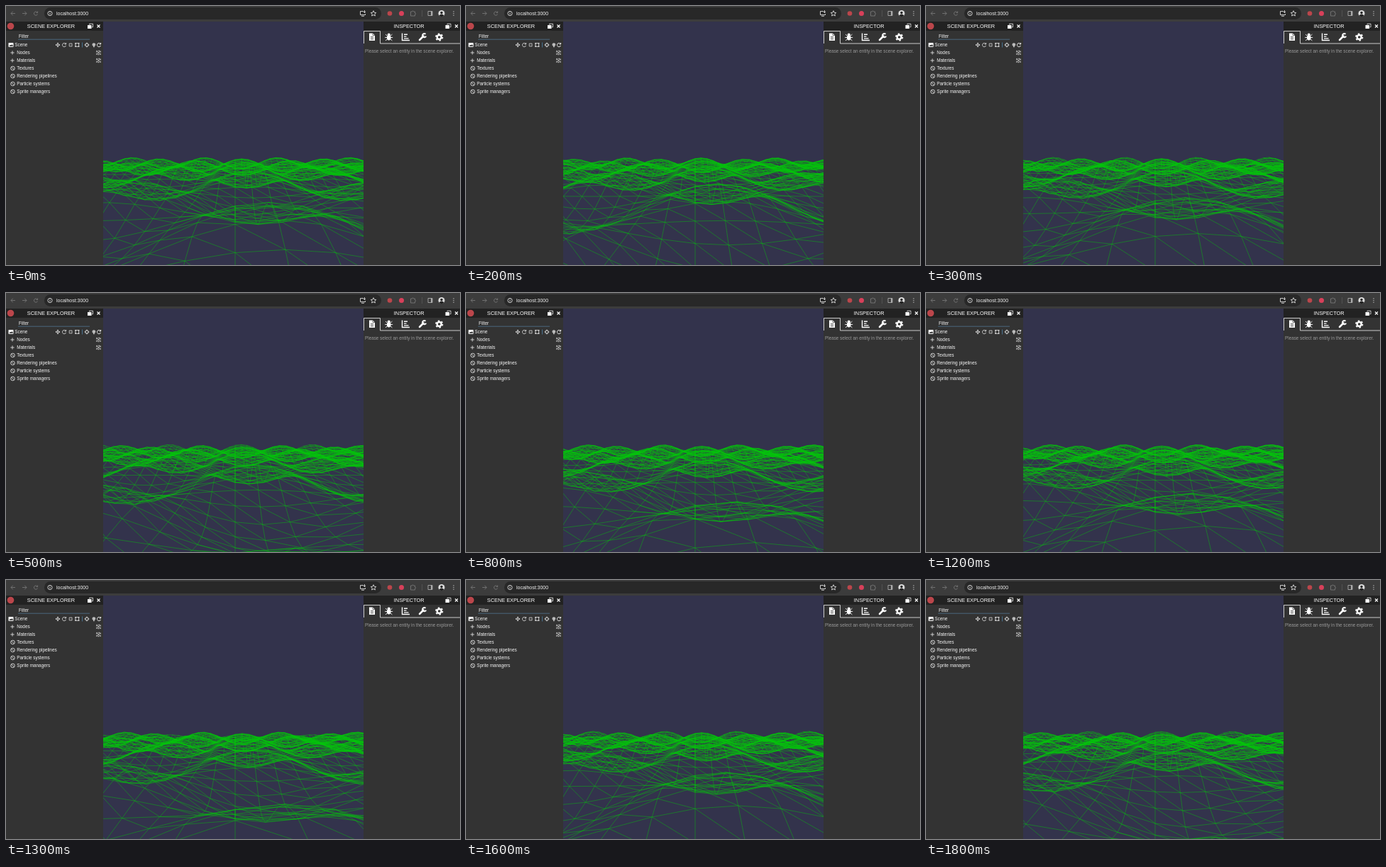
These frames come from a looping animation (640x366 px, 1900 ms). An HTML page with a canvas:

```html
<!DOCTYPE html>
<html lang="en">
<head>
<meta charset="utf-8">
<title>Wireframe waves</title>
<style>
  html, body { margin: 0; width: 100%; height: 100%; overflow: hidden; background: #333; }
  svg, canvas { position: absolute; left: 0; top: 0; }
  canvas { left: 137px; top: 22px; }
  text { font: 6.4px "Liberation Sans", Arial, sans-serif; fill: #f4f4f4; }
  .head { font-size: 7.35px; fill: #fff; }
  .line { fill: none; stroke: #ddd; stroke-width: .9; }
  .dim { stroke: #777; }
  .solid { fill: #fff; }
</style>
</head>
<body>
<svg width="640" height="366" viewBox="0 0 640 366">
  <defs>
    <g id="popup"><path class="solid" d="M-4-1.5h5.5v5H-4z"/><path class="line" d="M-1.5-2v-1.3h5v4.6H2"/></g>
    <path id="close" d="M-2-2 2 2M2-2-2 2" stroke="#fff" stroke-width="1.1"/>
    <g id="ban" class="line" stroke-width=".7"><circle r="2.8"/><path d="M-2-2 2 2"/></g>
    <path id="plus" class="line" d="M-2.6 0h5.2M0-2.6v5.2"/>
    <g id="expand" class="line"><path d="M-2.3-2.3 2.3 2.3M2.3-2.3-2.3 2.3"/><path stroke-dasharray="2 1.4" stroke-dashoffset="1" d="M-2.7-2.7h5.4v5.4h-5.4z"/></g>
    <path id="turn" d="M2.2-1.4A2.6 2.6 0 1 0 2.5 1M2.6-3v2H.6"/>
  </defs>

  <!-- browser bar -->
  <path fill="#3c3c3c" d="M0 0h640v22H0z"/>
  <rect x="54" y="2" width="475" height="17" rx="8.5" fill="#282828"/>
  <g class="line dim">
    <path d="M13 10.5H7m2.7-2.8L7 10.5l2.7 2.8M23 10.5h6m-2.7-2.8 2.7 2.8-2.7 2.8"/>
    <use href="#turn" x="42" y="10.5"/>
    <path d="M570.5 8h2a1 1 0 0 1 2 0h2v2a1 1 0 0 1 0 2v2h-6z"/>
    <path d="M586.5 6v9" stroke="#555"/>
  </g>
  <g class="line">
    <circle cx="62" cy="10.5" r="3.1"/><path d="M62 10v2.2M62 8.4v.9"/>
    <path d="M504 7.5h-4.5v5h7V11M501 14.3h4M505.5 6v3.5m-1.5-1.5 1.5 1.5L507 8"/>
    <path d="m518 6.7 1.1 2.5 2.7.3-2 1.8.6 2.7-2.4-1.4-2.4 1.4.6-2.7-2-1.8 2.7-.3z"/>
    <g stroke="#aaa"><path d="M595 7.5h6v6h-6z"/><path d="M600 7.5v6" stroke-width="2"/></g>
  </g>
  <text x="71" y="13" style="font-size:7px">localhost:3000</text>
  <circle cx="541" cy="10.5" r="3.3" fill="#bb464b"/>
  <circle cx="557.5" cy="10.5" r="3.5" fill="#d8405a"/>
  <circle cx="614" cy="10.5" r="4.5" fill="#ddd"/>
  <path fill="#222" d="M610.5 13.5q3.5-4 7 0a4.5 4.5 0 0 1-7 0"/><circle cx="614" cy="9.5" r="1.7" fill="#222"/>
  <path stroke="#bbb" stroke-width="1.2" stroke-dasharray="1.2 1.4" d="M631 7.3v6.5"/>

  <!-- panel headers -->
  <path fill="#222" d="M0 22h137v13H0zM504 22h136v13H504z"/>
  <circle cx="6.5" cy="28.5" r="4.8" fill="#bb464b"/>
  <text class="head" x="29.8" y="31.2">SCENE EXPLORER</text>
  <text class="head" x="546.8" y="31.2">INSPECTOR</text>
  <use href="#popup" x="119" y="28.5"/><use href="#close" x="130.5" y="28.5"/>
  <use href="#popup" x="623.5" y="28.5"/><use href="#close" x="635" y="28.5"/>

  <!-- scene explorer -->
  <text x="18" y="45" style="font-size:6.3px">Filter</text>
  <path d="M17 47.2h101" stroke="#557f9c" stroke-width=".7"/>
  <rect class="solid" x="3.5" y="52" width="7" height="6" rx=".8"/>
  <path d="m4.3 57 2-2.2 1 1 1.2-1.8 1.6 3z" fill="#333"/>
  <g class="line" stroke-width=".8">
    <path d="M70 55h6M73 52v6M71.2 54l-1.2 1 1.2 1m3.6-2 1.2 1-1.2 1M72 53.2l1-1.2 1 1.2m-2 3.6 1 1.2 1-1.2"/>
    <use href="#turn" x="82" y="55"/>
    <path d="M88.5 54h1.7v-1.7m2 0V54h1.6m0 2h-1.6v1.7m-2 0V56h-1.7"/>
    <path d="M98 52.7h4.6v4.6H98z" /><path stroke-dasharray="1.5 3.1" stroke-width="1.6" stroke-dashoffset=".7" d="M98 52.7h4.6v4.6H98z"/>
    <path d="M107.5 51.5v7" stroke="#4a7898"/>
    <circle cx="114" cy="55" r="2.3"/><path d="M114 51.7v2m0 2.6v2M110.7 55h2m2.6 0h2"/>
    <use href="#turn" x="131" y="55" stroke="#fff"/>
  </g>
  <path fill="#bbb" d="M123 58.2v-1.4a2.4 2.4 0 1 1 1.8 0v1.4z"/>
  <text x="12.2" y="57.3">Scene</text>
  <text x="15.2" y="68.3">Nodes</text><use href="#plus" x="9" y="66"/><use href="#expand" x="130.5" y="66"/>
  <text x="15.2" y="79.3">Materials</text><use href="#plus" x="9" y="77"/><use href="#expand" x="130.5" y="77"/>
  <text x="15.2" y="90.3">Textures</text><use href="#ban" x="9.5" y="88"/>
  <text x="15.2" y="101.3">Rendering pipelines</text><use href="#ban" x="9.5" y="99"/>
  <text x="15.2" y="112.3">Particle systems</text><use href="#ban" x="9.5" y="110"/>
  <text x="15.2" y="123.3">Sprite managers</text><use href="#ban" x="9.5" y="121"/>

  <!-- inspector -->
  <path class="line" stroke-width=".7" d="M504.5 53V35.5h23V53H640"/>
  <path class="solid" d="M512 38.5h5l3 3v7.5h-8z"/>
  <path d="M513.8 43.5h4.4m-4.4 1.8h4.4m-4.4 1.8h4.4M517 38.5v3h3" class="line" style="stroke:#333;stroke-width:.7"/>
  <ellipse class="solid" cx="539.7" cy="44.7" rx="2.8" ry="3.8"/><circle class="solid" cx="539.7" cy="40.5" r="2"/>
  <path class="line" style="stroke:#fff" d="M534.2 44.5h11M535 40l2.5 2.3M544.4 40l-2.5 2.3M535 49l2.5-2.3m6.9 2.3-2.5-2.3"/>
  <path class="line" style="stroke:#fff;stroke-width:1.4" d="M558.5 38.5v10H569M561 40.3h5m-5 2.8h3.5m-3.5 2.8h6.5"/>
  <path d="m583 48 5.5-5.5" stroke="#fff" stroke-width="2.5" stroke-linecap="round"/>
  <path d="M591.5 39.8a2.6 2.6 0 1 0 .6 2.8" fill="none" stroke="#fff" stroke-width="2"/>
  <circle cx="610.7" cy="44" r="3" fill="none" stroke="#fff" stroke-width="2.4"/>
  <circle cx="610.7" cy="44" r="4.8" fill="none" stroke="#fff" stroke-width="1.6" stroke-dasharray="2.5 2.53"/>
  <text x="506" y="66" style="font-size:6.33px;fill:#999">Please select an entity in the scene explorer.</text>
</svg>
<canvas id="view" width="367" height="344"></canvas>

<script>
const ctx = document.getElementById("view").getContext("2d");
const LOOP = 1900, STEP = 100;
const FOCAL = 425, CENTER_X = 186, HORIZON = 180;
const EYE = 1.25, AMPLITUDE = 0.5, WAVE_X = 0.5, CELL = 0.5;
const FAR = 26.5, ROWS = 52, HALF_COLS = 25;

// [step, distance of the wave trough]; the waves roll towards the viewer
const KEYS = [[0, 7.2], [3, 1.37], [5, -1.52], [8, -6.17], [10, -9.35], [13, -13.2], [18, -20.42]];

function phaseAt(step) {
  const i = KEYS.findIndex(key => key[0] >= step);
  if (i < 1) return KEYS[0][1];
  const [s0, p0] = KEYS[i - 1], [s1, p1] = KEYS[i];
  return p0 + (p1 - p0) * (step - s0) / (s1 - s0);
}

function project(row, col, phase) {
  const x = col * CELL, depth = FAR - row * CELL;
  const height = -AMPLITUDE * Math.cos(x - WAVE_X) * Math.cos(depth - phase);
  const scale = FOCAL / depth;
  return [CENTER_X + x * scale, HORIZON + (EYE - height) * scale];
}

function draw(step) {
  const phase = phaseAt(step);
  const line = (...nodes) => nodes.forEach(([row, col], i) =>
    ctx[i ? "lineTo" : "moveTo"](...project(row, col, phase)));

  ctx.fillStyle = "#33334c";
  ctx.fillRect(0, 0, 367, 344);
  ctx.strokeStyle = "#06c60c";
  ctx.lineWidth = 0.45;
  ctx.beginPath();
  for (let row = 0; row < ROWS; row++) {
    for (let col = -HALF_COLS; col < HALF_COLS; col++) {
      line([row, col + 1], [row, col], [row + 1, col]);
      line([row, col], [row + 1, col + 1]);
    }
  }
  ctx.stroke();
}

let shown = -1;
function tick(now) {
  const step = Math.floor(now % LOOP / STEP);
  if (step !== shown) draw(shown = step);
  requestAnimationFrame(tick);
}
draw(0);
requestAnimationFrame(tick);
</script>
</body>
</html>
```
